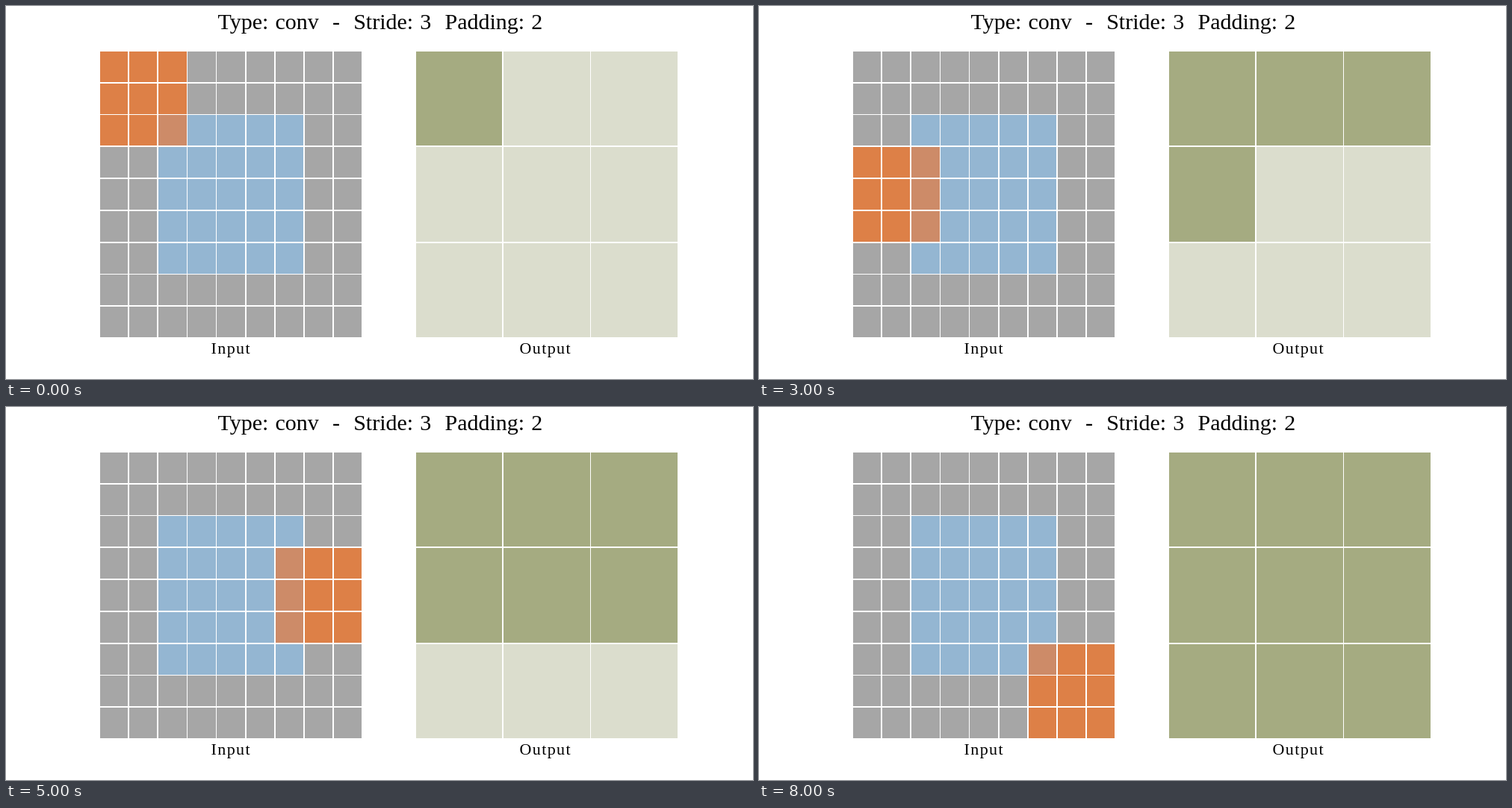
Recreate the animation shown at these times as an HTML page. Size 1000 by 500 pixels, loop 9 s.

```html
<!DOCTYPE html>
<html lang="en">
<head>
<meta charset="utf-8">
<title>Convolution with stride and padding</title>
<style>
  html, body { margin: 0; width: 100%; height: 100%; overflow: hidden; background: #fff; }
  svg { display: block; width: 1000px; height: 500px; }
  rect { shape-rendering: crispEdges; }
  text { font: 30px "Liberation Serif", serif; word-spacing: 1.6px; white-space: pre; }
  .label { font-size: 22px; letter-spacing: 1.4px; }
</style>
</head>
<body>
<svg viewBox="0 0 1000 500">
  <g id="cells"></g>
  <text x="283.5" y="30.5">Type: conv  -  Stride: 3  Padding: 2</text>
  <text class="label" x="274.5" y="466">Input</text>
  <text class="label" x="687.5" y="466">Output</text>
</svg>
<script>
const STEP_MS = 1000, KERNEL = 3, STRIDE = 3, PADDING = 2, SIZE = 5;
const PADDED = SIZE + 2 * PADDING;
const OUT = (PADDED - KERNEL) / STRIDE + 1;

const TOP = 60.8, INPUT_LEFT = 126.05, OUTPUT_LEFT = 548.8;
const PITCH_X = 39.1, PITCH_Y = 42.8, GAP = 1.8;

const COLORS = {
  padding: '#a6a6a6', input: '#94b6d2',
  windowPadding: '#dd8047', windowInput: '#cd8b68',
  pending: '#dbddcd', done: '#a5ab81'
};

const layer = document.getElementById('cells');

// Start and length of one cell along an axis, snapped to whole pixels.
function span(origin, pitch, index) {
  const start = Math.round(origin + pitch * index);
  const end = Math.round(origin + pitch * (index + 1) - GAP);
  return [start, end - start];
}

function makeGrid(left, count) {
  const scale = PADDED / count;
  return Array.from({ length: count * count }, (_, i) => {
    const row = Math.floor(i / count), col = i % count;
    const [x, width] = span(left, PITCH_X * scale, col);
    const [y, height] = span(TOP, PITCH_Y * scale, row);
    const rect = document.createElementNS('http://www.w3.org/2000/svg', 'rect');
    for (const [name, value] of Object.entries({ x, y, width, height })) {
      rect.setAttribute(name, value);
    }
    layer.append(rect);
    return { rect, row, col };
  });
}

const inputCells = makeGrid(INPUT_LEFT, PADDED);
const outputCells = makeGrid(OUTPUT_LEFT, OUT);

const within = (i, start, length) => i >= start && i < start + length;
const inSquare = (cell, row, col, size) =>
  within(cell.row, row, size) && within(cell.col, col, size);

function paint(step) {
  const row = Math.floor(step / OUT) * STRIDE;
  const col = step % OUT * STRIDE;
  for (const cell of inputCells) {
    const isInput = inSquare(cell, PADDING, PADDING, SIZE);
    const covered = inSquare(cell, row, col, KERNEL);
    const kind = covered ? (isInput ? 'windowInput' : 'windowPadding')
                         : (isInput ? 'input' : 'padding');
    cell.rect.setAttribute('fill', COLORS[kind]);
  }
  outputCells.forEach(({ rect }, i) =>
    rect.setAttribute('fill', i <= step ? COLORS.done : COLORS.pending));
}

let shown = -1;
function tick() {
  const step = Math.floor(performance.now() / STEP_MS) % (OUT * OUT);
  if (step !== shown) paint(shown = step);
  requestAnimationFrame(tick);
}
tick();
</script>
</body>
</html>
```
